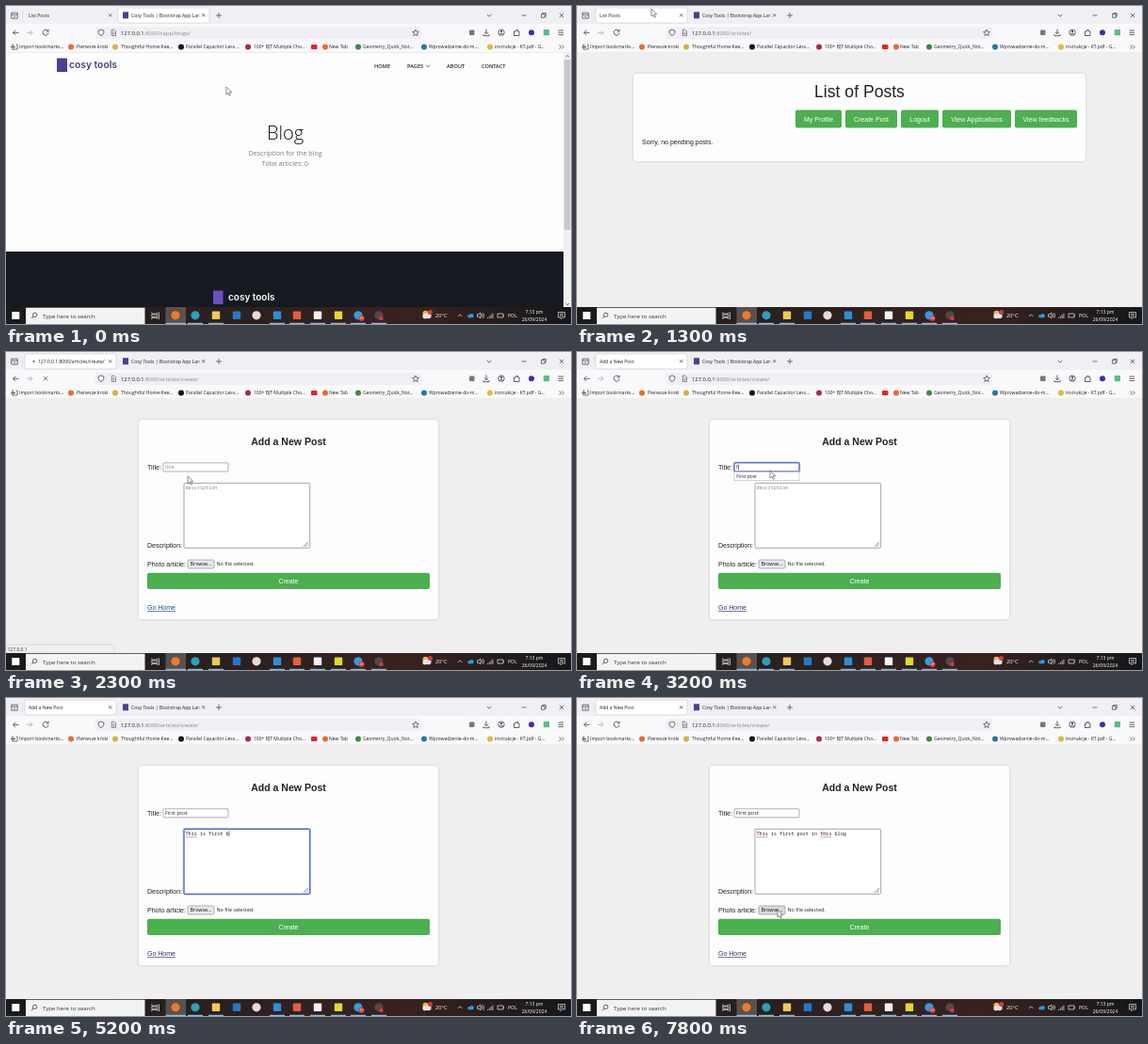
These frames come from a looping animation (600x338 px, 8000 ms). An HTML page:

```html
<!DOCTYPE html>
<html lang="en">
<head>
<meta charset="utf-8">
<title>Blog walkthrough</title>
<style>
html, body { margin: 0; width: 100%; height: 100%; overflow: hidden; background: #f0f0f4; }
svg { display: block; width: 600px; height: 338px; }
text { font-family: "Open Sans", "Noto Sans", sans-serif; white-space: pre; }
.arial { font-family: "Liberation Sans", Arial, sans-serif; }
.mono { font-family: "Noto Sans Mono", "DejaVu Sans Mono", monospace; }
.brand { font-family: Inter, sans-serif; font-weight: 600; }
</style>
</head>
<body>
<svg id="stage" viewBox="0 0 600 338" xmlns="http://www.w3.org/2000/svg"></svg>
<script>
const LOOP = 8000;
const INK = '#3c3c44';
const stage = document.getElementById('stage');

// Markup helpers
const text = (x, y, s, size, extra = '') => `<text x="${x}" y="${y}" font-size="${size}" ${extra}>${s}</text>`;
const rect = (x, y, w, h, fill, extra = '') => `<rect x="${x}" y="${y}" width="${w}" height="${h}" fill="${fill}" ${extra}/>`;
const dot = (x, y, r, fill, extra = '') => `<circle cx="${x}" cy="${y}" r="${r}" fill="${fill}" ${extra}/>`;
const line = (d, stroke = INK, width = .8, extra = '') =>
  `<path d="${d}" fill="none" stroke="${stroke}" stroke-width="${width}" ${extra}/>`;
const hoop = (x, y, r) => dot(x, y, r, 'none', `stroke="${INK}" stroke-width=".8"`);
const group = (id, body, extra = '') => `<g id="${id}" ${extra}>${body}</g>`;
const cross = (x, y, r) => line(`M${x - r} ${y - r}l${2 * r} ${2 * r}m0 ${-2 * r}l${-2 * r} ${2 * r}`, INK, .7);
const arial = 'class="arial" fill="#222"';
const mid = 'text-anchor="middle"';

function tabs() {
  const active = x => rect(x, 2, 97, 16, '#fff', 'rx="2" stroke="#c9c9d0" stroke-width=".6"');
  return rect(0, 0, 600, 19, '#f0f0f4')
    + group('tabOne', active(20)) + group('tabTwo', active(119))
    + line('M5.8 7.2h6.4v6H5.8zM5.8 9.2h6.4M8 11.3h2', INK, .7) + line('M17.5 5v10', '#d4d4da', .5)
    + text(24, 11.7, '', 5, 'id="tabTitle" fill="#222"')
    + dot(29.5, 10, 1.1, '#555', 'id="spinner"')
    + rect(124, 6.3, 6, 7, '#4b3f98')
    + text(133, 11.7, 'Cosy Tools | Bootstrap App Landing', 5, 'fill="#222" clip-path="url(#tabClip)"')
    + cross(110.7, 9.8, 1.6) + cross(209.7, 9.8, 1.6)
    + line('M223 10h6M226 7v6', INK, .7) + line('M511 9l2.2 2.2 2.2-2.2')
    + line('M547.5 10h5M568.5 8.7h3.6v3.6h-3.6zM569.7 8.7v-1.2h3.6v3.6h-1.2', INK, .7) + cross(590, 10, 2.2);
}

function toolbar() {
  return rect(0, 19, 600, 19, '#f9f9fb')
    + line('M13.5 28.3H7.5l2.7-2.7M7.5 28.3l2.7 2.7')
    + line('M22 28.3h6l-2.7-2.7M28 28.3l-2.7 2.7', '#aeaeb4')
    + group('reload', line('M44.4 26.2a3 3 0 1 0 .7 2.4M45 24.7v2.3h-2.3')) + group('stop', cross(42, 28.3, 2.2))
    + rect(95, 22, 346, 13, '#f0f0f4', 'rx="2"')
    + line('M101 25l2.8 1v2.4q-.4 2.2-2.8 3.2-2.4-1-2.8-3.2V26z', INK, .7)
    + line('M112.3 25.2h2.5l1.7 1.7v4.5h-4.2zM113.4 28h2M113.4 29.6h2', INK, .6)
    + `<text x="122" y="30.7" font-size="5.85" fill="#222">127.0.0.1<tspan id="path" fill="#85858c"></tspan></text>`
    + line('M435 25l1 2.2 2.4.3-1.8 1.6.5 2.4-2.1-1.2-2.1 1.2.5-2.4-1.8-1.6 2.4-.3z', INK, .7)
    + rect(492, 25.6, 5.5, 5.5, '#777', 'rx="1"')
    + line('M510 24.5v5M507.9 27.6l2.1 2.1 2.1-2.1M507 30v1.7h6V30')
    + hoop(526, 28.2, 3.2) + dot(526, 27.2, 1.1, INK) + line('M524 30.2q2-1.8 4 0')
    + line('M539.5 27h2v-1.4h2V27h1.5v4.5h-5.5z')
    + dot(558, 28.2, 3, '#4c25a8') + rect(570.8, 25, 6.2, 6.2, '#58bd8c')
    + line('M586.5 26h5.5M586.5 28.3h5.5M586.5 30.6h5.5');
}

function bookmarks() {
  const items = [
    [69, 75, '#ee6a2c', 'Pierwsze kroki'], [116, 122, '#d9b13c', 'Thoughtful Home-Kee...'],
    [186, 191, '#161616', 'Parallel Capacitor Less...'], [257, 263, '#a62c48', '100+ BJT Multiple Cho...'],
    [339, 343, '#ee6a2c', 'New Tab'], [374, 379, '#3f8a45', 'Geometry_Quick_Not...'],
    [444, 449, '#2678a5', 'Wprowadzenie-do-m...'], [514, 519, '#e3b93b', 'instrukcje - KT.pdf - G...']];
  return rect(0, 38, 600, 12, '#f9f9fb')
    + rect(181, 38.7, 69, 10, '#e2e2e7', 'rx="2" id="markHover"')
    + line('M8 41h-1.3v5H12v-5h-1.2M5 43.5h4.3l-1.5-1.5M9.3 43.5l-1.5 1.5', INK, .7)
    + text(14, 45.3, 'Import bookmarks...', 5, 'fill="#222"')
    + rect(324, 41, 6.5, 5, '#e8202a', 'rx="1"')
    + items.map(([ix, tx, c, s]) => dot(ix, 43.5, 3, c) + text(tx, 45.3, s, 5, 'fill="#222"')).join('')
    + line('M587.5 41.5l2 2-2 2M590.3 41.5l2 2-2 2', INK, .7)
    + rect(0, 49.5, 600, .5, '#dedee2');
}

function blog() {
  const nav = [[391, 'HOME'], [426, 'PAGES'], [468, 'ABOUT'], [505, 'CONTACT']];
  const grey = `${mid} fill="#7c7c7c"`;
  return rect(0, 50, 600, 270, '#fdfdfd') + rect(0, 261, 592, 59, '#171920')
    + rect(54, 55.5, 11, 14.5, '#4b3f98') + text(67, 66.3, 'cosy tools', 10.3, 'class="brand" fill="#3c4274"')
    + nav.map(([x, s]) => text(x, 65.7, s, 5.65, 'font-weight="600" fill="#25252c"')).join('')
    + line('M446 62.8l2 2 2-2')
    + text(296.5, 142, 'Blog', 20, `${mid} font-weight="300" fill="#111"`)
    + text(296.5, 159.2, 'Description for the blog', 7.1, grey)
    + text(296.5, 170.2, 'Total articles: 0', 7.1, grey)
    + rect(220, 302.5, 10.5, 14.5, '#6a4fc0') + text(236, 313.3, 'cosy tools', 10, 'class="brand" fill="#fff"')
    + rect(592, 50, 8, 270, '#f0f0f0') + rect(592.7, 57, 6.8, 181, '#c9c9cb')
    + line('M594.6 54.2l1.7-1.7 1.7 1.7M594.6 316l1.7 1.7 1.7-1.7');
}

const card = (x, y, w, h) => rect(0, 50, 600, 270, '#efeff0')
  + rect(x, y, w, h, '#fdfdfd', 'rx="4" filter="url(#shade)"');

function list() {
  const buttons = [[232, 49, 'My Profile'], [285, 55, 'Create Post'], [344, 40, 'Logout'],
    [388, 73, 'View Applications'], [465, 66, 'View feedbacks']];
  return card(60, 72, 480, 93)
    + text(300, 97, 'List of Posts', 17.6, `${arial} ${mid}`)
    + buttons.map(([x, w, s], i) => rect(x, 110.5, w, 19, '#4caf50', `rx="2" id="button${i}"`)
      + text(x + w / 2, 122.7, s, 7.03, `class="arial" fill="#fff" ${mid}`)).join('')
    + text(69, 146.5, 'Sorry, no pending posts.', 7.03, arial);
}

function form() {
  const label = (y, s) => text(150, y, s, 7.03, arial);
  const ring = (id, x, y, w, h) => group(id,
    rect(x - .8, y - .8, w + 1.6, h + 1.6, 'none', 'rx="1.6" stroke="#a9bef0" stroke-width=".9"')
    + rect(x, y, w, h, 'none', 'rx="1" stroke="#2b50c4" stroke-width=".9"'));
  const wave = (id, x) => line(`M${x} 148.2${'l.75 -.8l.75 .8'.repeat(8)}`, '#e03030', .55, `id="${id}"`);
  return card(141, 72, 318, 212)
    + text(300, 98.8, 'Add a New Post', 10.55, `${arial} font-weight="700" ${mid}`)
    + label(124.6, 'Title:') + label(207.6, 'Description:') + label(227.5, 'Photo article:')
    + rect(167, 117.8, 69, 9.2, '#fff', 'stroke="#8f8f9d" stroke-width=".7" rx="1"')
    + text(169, 124.4, '', 5.5, 'id="title"')
    + ring('titleRing', 167, 117.8, 69, 9.2)
    + line('M171.5 119.6v5.8', '#222', .6, 'id="titleCaret"')
    + rect(189, 139.3, 133.7, 69, '#fff', 'stroke="#8f8f9d" stroke-width=".8" rx="1"')
    + ring('descRing', 189, 139.3, 133.7, 69)
    + line('M316 207l5-5M318.5 207l2.5-2.5', '#777')
    + text(190.5, 146.2, '', 5.13, 'id="desc" class="mono"')
    + line('M0 141.3v6', '#222', .6, 'id="descCaret"')
    + wave('waveOne', 190.6) + wave('waveTwo', 258.3)
    + group('hint', rect(167, 127.4, 69, 9, '#fff', 'stroke="#b5b5bd" stroke-width=".6"') + text(169.3, 133.8, 'First post', 5, 'fill="#222"'))
    + rect(193, 221, 28, 9, '#e9e9ed', 'id="browse" rx="1.2" stroke="#8f8f9d" stroke-width=".7"')
    + text(207, 227.4, 'Browse...', 5.4, `${mid} fill="#111"`)
    + text(223.5, 227.4, 'No file selected.', 5.45, 'fill="#222"')
    + rect(150, 234.8, 300, 17.2, '#4caf50', 'rx="2"')
    + text(300, 246, 'Create', 7.03, `class="arial" fill="#fff" ${mid}`)
    + text(150, 274.4, 'Go Home', 7.03, 'id="home" class="arial" text-decoration="underline"');
}

function taskbar() {
  const apps = [[180, '#f07a2a'], [201, '#2f9fb5'], [223, '#f0c95a', 1], [245, '#2578c8', 1], [266, '#e6dce0'],
    [288, '#2c8fd8', 1], [309, '#e06038', 1], [331, '#f4f4f4', 1], [353, '#e2d835', 1], [374, '#2f9ede'], [396, '#54484a']];
  const running = [201, 223, 288, 309, 331, 353, 374, 396];
  const icon = d => line(d, '#eee', .7);
  return rect(0, 320, 600, 18, 'url(#bar)')
    + rect(6.3, 325, 8, 8, '#fff')
    + rect(21, 320.7, 126.5, 17.3, '#f4f3f3') + hoop(30.6, 328.3, 2.2) + line('M29 330l-2 2.2')
    + text(39, 331.6, 'Type here to search', 6.1, 'fill="#333"')
    + icon('M154.8 325.5v1.6h6v-1.6M154.8 333v-1.6h6V333M154.8 328h6v2.4h-6zM162.5 325.5v7.5')
    + rect(169.5, 320, 21.5, 18, '#5a504e')
    + apps.map(([x, c, square]) => square ? rect(x - 4.2, 324.6, 8.4, 8.4, c, 'rx=".8"') : dot(x, 328.8, 4.6, c)).join('')
    + rect(169.5, 336.8, 21.5, 1.2, '#86bde8') + running.map(x => rect(x - 8, 336.8, 16, 1.2, '#86bde8')).join('')
    + dot(377.5, 332, 3, '#e0363a') + text(377.5, 333.3, '43', 3.6, `${mid} fill="#fff"`)
    + dot(398.5, 332, 2.2, '#e0363a')
    + dot(445.5, 326.8, 3, '#f3b63c') + dot(445, 329.7, 2.6, '#dce6ee') + dot(448.6, 329.2, 3, '#dce6ee') + dot(450.5, 325.5, 2.5, '#d8383a')
    + text(456, 331, '20°C', 5.7, 'fill="#fff"')
    + icon('M480 330l2.2-2.2 2.2 2.2')
    + dot(492, 329.8, 1.8, '#2f97e4') + dot(494.5, 329.2, 2.3, '#2f97e4')
    + icon('M500.5 327.7h1.5l2-1.7v6l-2-1.7h-1.5zM505.2 327.5q1.2 1.5 0 3M506.5 326.2q2.4 2.8 0 5.6')
    + icon('M511.5 332v-1M513.3 332v-2.5M515.1 332v-4M516.9 332v-5.5')
    + icon('M522 327h6v4h-6zM528.5 328.3v1.4')
    + text(533, 331, 'POL', 5.2, 'fill="#fff"')
    + text(561, 327.2, '7:13 pm', 5, `${mid} fill="#fff"`) + text(561, 335.4, '26/09/2024', 5, `${mid} fill="#fff"`)
    + icon('M586.5 325.5h7v5.5h-3l-1.6 1.6v-1.6h-2.4zM588 327.4h4M588 329.2h4');
}

// Long query string shown while a bookmark is hovered
function longLink() {
  const chars = 'ABCDEFGHIJKLMNOPQRSTUVWXYZabcdefghijklmnopqrstuvwxyz0123456789';
  let seed = 7, tail = '';
  for (let i = 0; i < 170; i++) {
    seed = (seed * 1103 + 12345) % 65536;
    tail += i % 23 === 22 ? '.' : chars[seed % chars.length];
  }
  return 'https://www.electronics-tutorials.ws/transistor/tran_1.html?_gac=2.16004292.307733782&amp;_gl=1*' + tail;
}

stage.innerHTML = `<defs>
  <clipPath id="tabClip">${rect(133, 3, 72.5, 14, '#000')}</clipPath>
  <clipPath id="linkClip">${rect(0, 311, 591, 9, '#000')}</clipPath>
  <linearGradient id="bar">
    <stop offset="0" stop-color="#1b1a1c"/><stop offset=".3" stop-color="#272020"/>
    <stop offset=".72" stop-color="#38221f"/><stop offset=".88" stop-color="#241c1d"/><stop offset="1" stop-color="#16171b"/>
  </linearGradient>
  <filter id="shade" x="-5%" y="-10%" width="110%" height="120%"><feDropShadow dx="0" dy="0" stdDeviation="1.8" flood-opacity=".16"/></filter>
  </defs>`
  + group('blog', blog()) + group('list', list()) + group('form', form())
  + tabs() + toolbar() + bookmarks()
  + group('longStatus', rect(0, 311, 592, 9, '#f0f0f4') + text(1.5, 317.4, longLink(), 4.9, 'fill="#333" clip-path="url(#linkClip)"'))
  + group('status', rect(0, 311, 115, 9, '#f0f0f4', 'stroke="#c8c8cc" stroke-width=".5"') + text(1.5, 317.5, '', 5, 'id="statusText" fill="#333"'))
  + taskbar()
  + group('arrow', '<path d="M0 0v8l1.9-1.7 1.3 2.9 1.3-.6-1.3-2.8h2.5z" fill="#fff" stroke="#444" stroke-width=".6"/>')
  + group('beam', line('M-1.4-4h2.8M0-4v8M-1.4 4h2.8', '#666', .7));

const el = {};
stage.querySelectorAll('[id]').forEach(n => { el[n.id] = n; });
const show = (id, on) => { el[id].style.display = on ? '' : 'none'; };
const set = (id, s) => { if (el[id].textContent !== s) el[id].textContent = s; };
const within = (t, a, b) => t >= a && t < b;

// Pointer stops: time, x, y
const stops = [[0, 234, 86], [100, 234, 86], [400, 222, 43], [500, 222, 44], [700, 288, 162], [1000, 79, 3],
  [1400, 79, 3], [1800, 310, 118], [2100, 310, 118], [2300, 193, 132], [2700, 192, 122], [2900, 192, 122],
  [3200, 205, 126], [3500, 186, 131], [3750, 186, 131], [4100, 232, 162], [7000, 232, 162], [7600, 213, 225], [LOOP, 213, 225]];

function pointer(t) {
  const i = stops.findIndex(s => s[0] > t);
  const [a, b] = [stops[i - 1], stops[i]];
  const u = (t - a[0]) / (b[0] - a[0]), k = u * u * (3 - 2 * u);
  return [a[1] + (b[1] - a[1]) * k, a[2] + (b[2] - a[2]) * k];
}

function typed(t) {
  const first = 'This is first b', full = 'This is first post in this blog';
  const count = (from, step) => Math.max(0, Math.floor((t - from) / step));
  return t < 5400 ? first.slice(0, count(4300, 60)) : full.slice(0, 14 + count(5500, 80));
}

function draw(t) {
  const onBlog = t < 1100, onForm = t >= 2200, onList = !onBlog && !onForm;
  const loading = within(t, 2100, 2700);
  show('blog', onBlog); show('list', onList); show('form', onForm);
  show('tabOne', !onBlog); show('tabTwo', onBlog);
  set('tabTitle', loading ? '127.0.0.1:8000/articles/create/' : onForm ? 'Add a New Post' : 'List Posts');
  el.tabTitle.setAttribute('x', loading ? 34 : 24);
  show('spinner', loading); show('stop', loading); show('reload', !loading);
  set('path', onBlog ? ':8000/sapp/blogs/' : onForm ? ':8000/articles/create/' : ':8000/articles/');
  show('markHover', within(t, 300, 600));
  show('longStatus', within(t, 300, 800));
  el.longStatus.setAttribute('opacity', Math.min(1, (800 - t) / 200));
  show('status', within(t, 1800, 2700));
  set('statusText', t < 2100 ? '127.0.0.1:8000/articles/create/' : '127.0.0.1');
  el.button1.setAttribute('fill', within(t, 1700, 2200) ? '#45a049' : '#4caf50');

  const inTitle = within(t, 2900, 4200), inDesc = within(t, 4200, 7700);
  const letter = within(t, 3100, 3700);
  set('title', t < 3100 ? 'title' : letter ? 'f' : 'First post');
  el.title.setAttribute('fill', t < 3100 ? '#888' : '#222');
  show('titleRing', inTitle);
  show('titleCaret', inTitle && t < 3700);
  el.titleCaret.setAttribute('transform', `translate(${t < 3100 ? -2.3 : 0} 0)`);
  show('hint', letter);

  const words = typed(t), empty = !words;
  set('desc', empty ? 'description' : words);
  el.desc.setAttribute('fill', empty ? '#888' : '#222');
  show('descRing', inDesc);
  show('descCaret', inDesc && (t < 6900 || t % 1000 < 500));
  el.descCaret.setAttribute('transform', `translate(${190.7 + words.length * 3.08} 0)`);
  show('waveOne', words.length > 4); show('waveTwo', words.length > 26);
  el.browse.setAttribute('fill', t >= 7500 ? '#dadade' : '#e9e9ed');
  el.home.setAttribute('fill', t < 2700 ? '#1c4c96' : '#3d2c78');

  const [x, y] = pointer(t);
  const beam = (onBlog && x > 257 && x < 335 && y > 152 && y < 172) || (onForm && x > 189 && x < 323 && y > 140 && y < 208);
  const hidden = within(t, 4300, 7000);
  show('arrow', !beam && !hidden); show('beam', beam && !hidden);
  for (const id of ['arrow', 'beam']) el[id].setAttribute('transform', `translate(${x} ${y})`);
}

const start = performance.now();
function tick() {
  const t = (performance.now() - start) % LOOP;
  draw(Math.floor(t / 100) * 100);
  requestAnimationFrame(tick);
}
tick();
</script>
</body>
</html>
```
